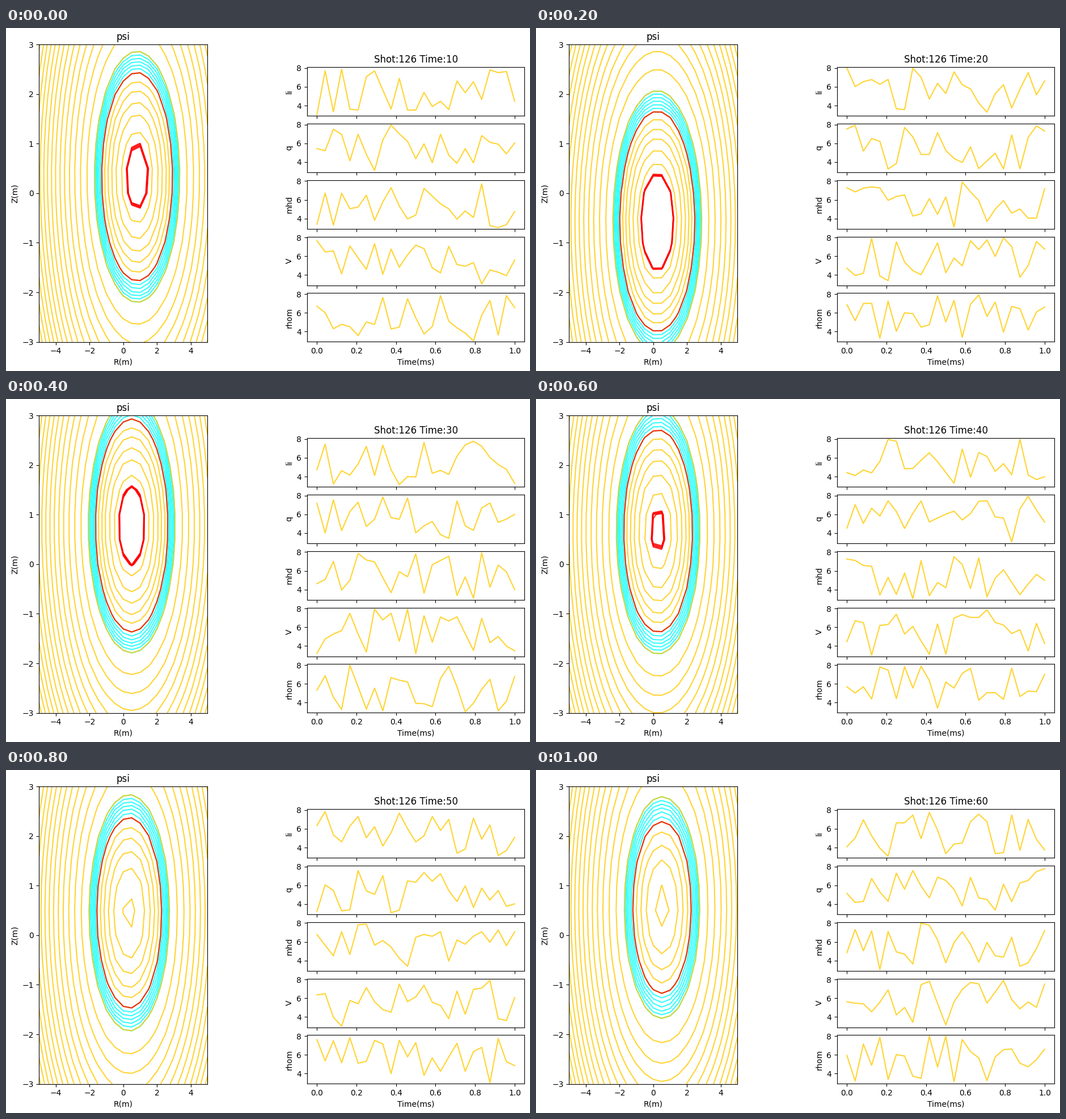
These frames come from a looping animation (924x606 px, 1200 ms). A matplotlib script:

```python
import numpy as np
import matplotlib.pyplot as plt
from matplotlib.animation import FuncAnimation

WIDTH, HEIGHT, DPI = 924, 606, 100
GOLD, CYAN, RED = "#ffca00", "#00ffff", "#ff0000"
ALPHA = 0.8
SIGNALS = ["li", "q", "mhd", "V", "rhom"]
SAMPLES = 25

# Plasma state at each step: centre R, centre Z, flux at the boundary
STATES = [
    (0.82, 0.33, 4.47),
    (0.24, -0.57, 4.99),
    (0.50, 0.78, 4.66),
    (0.29, 0.67, 4.22),
    (0.36, 0.455, 3.73),
    (0.52, 0.56, 3.06),
]

# Flux levels measured from the boundary
EDGE_LEVELS = np.linspace(0, 2, 7)
FLUX_LEVELS = np.concatenate([np.arange(-5, 1) * 5 / 7,
                              2 + np.arange(20) * 17 / 7])
CORE_LEVELS = np.append(np.linspace(-4.04, -3.98, 5), 0)

R, Z = np.meshgrid(np.linspace(-5, 5, 21), np.linspace(-3, 3, 13))
times = np.linspace(0, 1, SAMPLES)
traces = np.random.default_rng(126).uniform(
    3, 8, (len(STATES), len(SIGNALS), SAMPLES))

fig = plt.figure(figsize=(WIDTH / DPI, HEIGHT / DPI), dpi=DPI)


def pixel_axes(left, top, width, height):
    return fig.add_axes([left / WIDTH, 1 - (top + height) / HEIGHT,
                         width / WIDTH, height / HEIGHT])


flux_ax = pixel_axes(58.3, 29.2, 297, 525.4)
flux_ax.set(title="psi", xlabel="R(m)", ylabel="Z(m)")

lines = []
signal_axes = []
for row, name in enumerate(SIGNALS):
    ax = pixel_axes(530.8, 69.2 + 99.8 * row, 383.6, 86)
    ax.set(xlim=(-0.05, 1.05), ylim=(2.9, 8.1), yticks=[4, 6, 8], ylabel=name)
    ax.tick_params(labelbottom=row == len(SIGNALS) - 1)
    lines += ax.plot(times, traces[0, row], color=GOLD, alpha=ALPHA)
    signal_axes.append(ax)
signal_axes[-1].set_xlabel("Time(ms)")

contours = []


def draw_contours(step):
    while contours:
        contours.pop().remove()
    r0, z0, boundary = STATES[step]
    psi = (R - r0) ** 2 + (Z - z0) ** 2 - boundary
    for levels, color in ((EDGE_LEVELS, CYAN), (FLUX_LEVELS, GOLD),
                          (CORE_LEVELS, RED)):
        contours.append(flux_ax.contour(
            R, Z, psi, levels=levels, colors=[color], alpha=ALPHA,
            linewidths=1.5, linestyles="solid"))


def update(step):
    draw_contours(step)
    for line, values in zip(lines, traces[step]):
        line.set_ydata(values)
    signal_axes[0].set_title(f"Shot:126 Time:{10 * (step + 1)}")


anim = FuncAnimation(fig, update, frames=len(STATES), interval=200,
                     repeat=True, repeat_delay=0)
plt.show()
```
